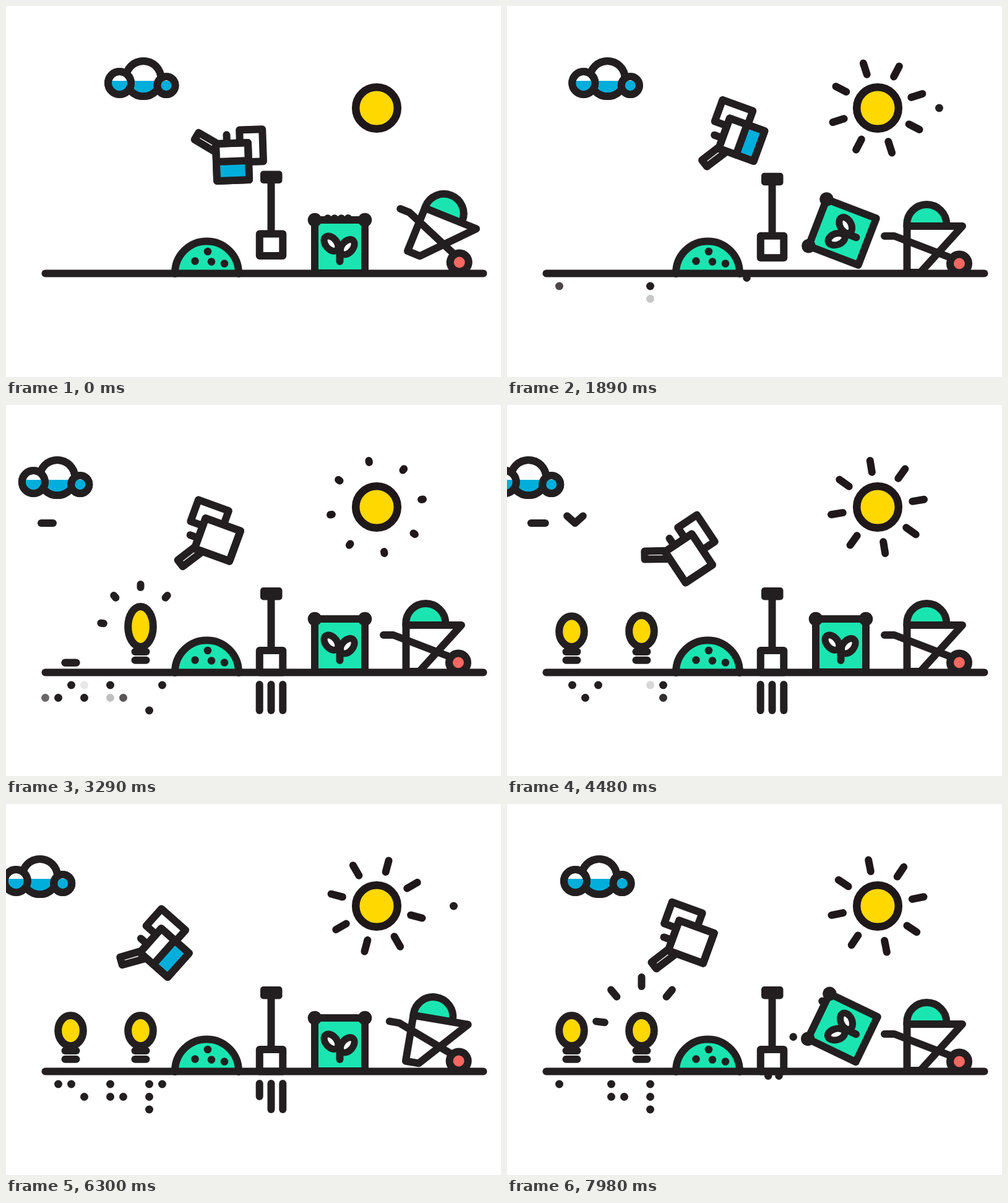
These frames come from a looping animation (800 px wide and 600 px high, 8 s). An HTML page with a canvas:

```html
<!DOCTYPE html>
<html lang="en">
<head>
<meta charset="utf-8">
<title>Garden</title>
<style>
  html, body { margin: 0; width: 100%; height: 100%; overflow: hidden; background: #fff; }
  canvas { display: block; width: 100vw; height: 100vh; }
</style>
</head>
<body>
<canvas id="stage" width="800" height="600"></canvas>
<script>
const ctx = document.getElementById('stage').getContext('2d');
const INK = '#231f20', SUN_INK = '#1f181b', GREEN = '#1ae5b0', BLUE = '#00aedb', YELLOW = '#ffd800', RED = '#f96860';
const LOOP = 8000, STEP = 70;

// ---- timing helpers ----
const linear = (t, a, b) => Math.min(1, Math.max(0, (t - a) / (b - a)));
const ease = (t, a, b) => { const s = linear(t, a, b); return s * s * (3 - 2 * s); };
const fade = (t, from, to, d = 280) => linear(t, from, from + d) * (1 - linear(t, to, to + d));
const mix = (a, b, s) => a + (b - a) * s;

// ---- drawing helpers ----
function paint(fill, stroke = INK, width = 12) {
  if (fill) { ctx.fillStyle = fill; ctx.fill(); }
  if (stroke) { ctx.strokeStyle = stroke; ctx.lineWidth = width; ctx.stroke(); }
}
function poly(points, fill, closed = true, stroke = INK) {
  ctx.beginPath();
  points.forEach(([x, y]) => ctx.lineTo(x, y));
  if (closed) ctx.closePath();
  paint(fill, stroke);
}
const line = (x1, y1, x2, y2, stroke) => poly([[x1, y1], [x2, y2]], null, false, stroke);
function box(x, y, w, h, fill) {
  ctx.beginPath();
  ctx.rect(x, y, w, h);
  paint(fill);
}
function ellipse(x, y, rx, ry, fill, angle = 0, width = 12, stroke = INK) {
  ctx.beginPath();
  ctx.ellipse(x, y, rx, ry, angle, 0, 7);
  paint(fill, stroke, width);
}
function disc(x, y, r = 6.3, alpha = 1) {
  ctx.globalAlpha = alpha;
  ellipse(x, y, r, r, INK, 0, 0, null);
  ctx.globalAlpha = 1;
}
function dome(x, y, r, base) {
  ctx.beginPath();
  ctx.moveTo(x - r, base);
  ctx.arc(x, y, r, Math.PI, 0);
  ctx.lineTo(x + r, base);
  paint(GREEN);
}
function placed(x, y, degrees, draw) {
  ctx.save();
  ctx.translate(x, y);
  ctx.rotate(degrees * Math.PI / 180);
  draw();
  ctx.restore();
}
// Part of a polyline with equal segments, between fractions a and b.
function trimmed(points, a, b) {
  if (b - a < 0.01) return;
  const n = points.length - 1;
  const at = f => {
    const i = Math.min(n - 1, Math.floor(f * n)), s = f * n - i;
    return [mix(points[i][0], points[i + 1][0], s), mix(points[i][1], points[i + 1][1], s)];
  };
  poly([at(a), ...points.filter((p, i) => i / n > a && i / n < b), at(b)], null, false);
}

// ---- scene parts ----
function cloud(t) {
  const x = 222 - 194 * (ease(t, 50, 5040) - ease(t, 5180, 9980));
  for (const [dx, y, r] of [[0, 117.5, 28.5], [-38.5, 124.5, 18.5], [37, 128.5, 14.5]]) {
    ellipse(x + dx, y, r, r, '#fff');
    ctx.save();
    ctx.clip();
    ctx.fillStyle = BLUE;
    ctx.fillRect(x - 70, 121, 140, 40);
    ctx.restore();
    ellipse(x + dx, y, r, r);
  }
}

function wind(t) {
  const p = t % 2100, x = 61 - 19 * (1 - Math.cos(9e-4 * (t - 2550)));
  trimmed([[x, 191], [x + 23, 191]], 0, linear(p, 50, 250) * (1 - linear(p, 1120, 1530)));
  const half = 0.5 * linear(p, 140, 420) * (1 - linear(p, 700, 1000));
  const zigzag = [0, 1, 2, 3, 4].map(i => [x + 45.5 + 12.8 * i, i % 2 ? 179.5 : 191]);
  trimmed(zigzag, 0.5 - half, 0.5 + half);
}

function sun(t) {
  const p = t % 3500, out = ease(p, 2800, 3450), grow = ease(p, 100, 750);
  ellipse(599, 165, 33.8, 33.8, YELLOW, 0, 12.5, SUN_INK);
  for (let i = 0; i < 8 && grow > 0 && out < 1; i++) {
    placed(599, 165, 0.5 + 0.038 * t + 45 * i, () => line(0, -57 - 19 * out, 0, -57 - 19 * grow, SUN_INK));
  }
  disc(698.5, 165, 6.5, fade(p, 985, 2480));
  disc(723.5, 165, 6.5, fade(p, 2500, 2950));
}

function wateringCan(t) {
  const p = t % 4700;
  const tilt = ease(p, 1220, 1820) * (1 - ease(p, 4150, 4800));
  const x = 366 - 134 * linear(t, 1190, 6200) + 34 * linear(t, 6200, LOOP) + 32 * tilt;
  const y = 252 + 0.0011 * t - 37.8 * tilt ** 2;
  const refilling = t > 4700 ? 1 - linear(p, 0, 900) : 0;
  const level = mix(-1, 30, linear(p, 1870, 2680) + refilling);
  placed(x, y, -2 + 3 * ease(t, 0, 1190) - 71 * tilt, () => {
    box(13, -51, 37, 52, '#fff');
    line(-8, -44, -8, -30);
    poly([[-53, -49], [-26, -32], [-26, -16], [-60, -38]], '#fff');
    box(-26, -30, 52, 60, '#fff');
    ctx.fillStyle = BLUE;
    ctx.fillRect(-20, level, 40, Math.max(0, 25 - level));
    line(-26, level, 26, level);
    box(-26, -30, 52, 60);
  });
  for (let i = 0; i < 3; i++) {
    disc(x - 78.5 - 16.5 * i, y + 51 + 12 * i, 6.3, fade(p, 1900 + 200 * i, 2250 + 233 * i, 220));
  }
}

function mound() {
  dome(324.5, 432, 51.5, 433);
  for (const [x, y] of [[326, 397], [305.5, 412.5], [332, 413.5], [353, 416.5]]) disc(x, y);
}

function shovel(t) {
  const drop = 28.5 * linear(t, 1800, 2070) ** 2;
  ctx.beginPath();
  ctx.roundRect(411, 266.5 + drop, 35.5, 20.5, 5);
  paint(INK, null);
  line(428.5, 280 + drop, 428.5, 367 + drop);
  box(409.8, 368.5 + drop, 37.5, 35.5, '#fff');
  for (let i = 0; i < 3; i++) {
    const x = 409.7 + 18.8 * i, d = 220 * i;
    const length = 42 * ease(t, 2070 + d, 2470 + d) * (1 - ease(t, 6100 + d, 6500 + d));
    if (length > 0.1) line(x, 452, x, 452 + length);
  }
}

function seedBag(t) {
  const u = t % 6500, back = 1 - ease(u, 1750, 2350);
  const turn = -80 * ease(u, 1015, 1665) * back;
  const lift = ease(u, 780, 1460) * back;
  for (let i = 0; i < 5; i++) {
    if (u < 560) disc(520 + 11 * Math.min(i, 3), 343.5);
    const age = u - (600 + 85 * i + 7 * i * i), air = Math.min(age, 661);
    if (age > 0 && age < 840) {
      disc(555 - (3.4 + 0.6 * i) * 1e-7 * air ** 3, 346 - 0.44 * air + 0.00088 * air * air);
    }
  }
  placed(539.5 + 3 * lift, 389 - 27 * lift, turn, () => {
    box(-40.5, -43, 81, 86, GREEN);
    disc(-40.5, -43, 11.3);
    disc(40.5, -43, 11.3);
    line(0, 9, 0, 24);
    ellipse(-14, -4.8, 14, 9, '#fff', 0.87, 11);
    ellipse(12.3, 0.8, 14, 9, '#fff', -0.87, 11);
  });
}

function barrow(t) {
  const u = t % 6500;
  const hop = (a, b, h) => { const s = linear(u, a, b); return 4 * h * s * (1 - s); };
  const tilt = u > 5950 ? 22 * linear(u, 5950, 6500) ** 1.83
    : 22 * (1 - linear(u, 0, 360) ** 2) + hop(360, 760, 5) + hop(760, 1080, 1.2);
  placed(737, 420, tilt, () => {
    ctx.translate(-737, -420);
    dome(678.3, 353, 32, 356);
    poly([[646.5, 356], [736, 356], [668, 431], [646.5, 431]], '#fff');
    poly([[610, 372], [626, 372], [722, 409]], null, false);
    ellipse(731, 416.5, 15, 15, RED);
  });
}

function bulb(t, x, start) {
  const b = t - start, grown = Math.max(0, b - 500);
  if (b < 0) return;
  // Springs past full height once, then settles.
  const ry = 24.5 * (1 - Math.exp(-0.0019 * grown) * Math.cos(0.0053 * grown));
  if (ry > 0.5) ellipse(x, 391 - ry, Math.min(20.3, ry), ry, YELLOW);
  const rise = ease(b, 450, 800), pop = 15 * (1 - ease(b, 0, 200));
  for (const y of [416.7 - 17.7 * rise, 416.7 - 4 * rise]) line(x - 9, y + pop, x + 9, y + pop);
}

function bulbRays(t) {
  const p = t > 6000 ? t - 4400 : t;
  const grow = linear(p, 3190, 3490), out = linear(p, 3700, 4000);
  for (let i = -2; i < 2; i++) {
    const a = 0.733 * i, at = k => [217.5 + 60 * k * Math.sin(a), 360 - 65 * k * Math.cos(a)];
    trimmed([at(1), at(1.23)], out, grow);
  }
}

// Three groups of soil dots, written as column and row digits; each group lights up one dot after another.
const FLICKER = ['80', '10', '81', '51', '61', '50', '82'];
const STEADY = ['90', '31', '20'];
const BLINK = ['01', '11', '30', '40', '91'];
function soil(t) {
  const dot = ([col, row], alpha) => disc(63.5 + 21 * col, 453 + 20.5 * row, 6.5, alpha);
  FLICKER.forEach((cell, i) => dot(cell, fade(t, 1500 + 160 * i, 2700 + 130 * i) + linear(t, 4430 + 150 * i, 4710 + 150 * i)));
  STEADY.forEach((cell, i) => dot(cell, fade(t, 1980 + 500 * i, 6300)));
  BLINK.forEach((cell, i) => dot(cell, fade(t, 2300 + 480 * i, 3200 + 480 * i)));
}

function frame() {
  const now = performance.now() % LOOP, t = now - now % STEP;
  ctx.lineCap = ctx.lineJoin = 'round';
  ctx.fillStyle = '#fff';
  ctx.fillRect(0, 0, 800, 600);
  wind(t);
  cloud(t);
  sun(t);
  soil(t);
  mound();
  bulb(t, 104.5, 3100);
  bulb(t, 217.5, 2200);
  bulbRays(t);
  shovel(t);
  wateringCan(t);
  seedBag(t);
  barrow(t);
  line(63.5, 432.5, 771.5, 432.5);
  requestAnimationFrame(frame);
}
frame();
</script>
</body>
</html>
```
